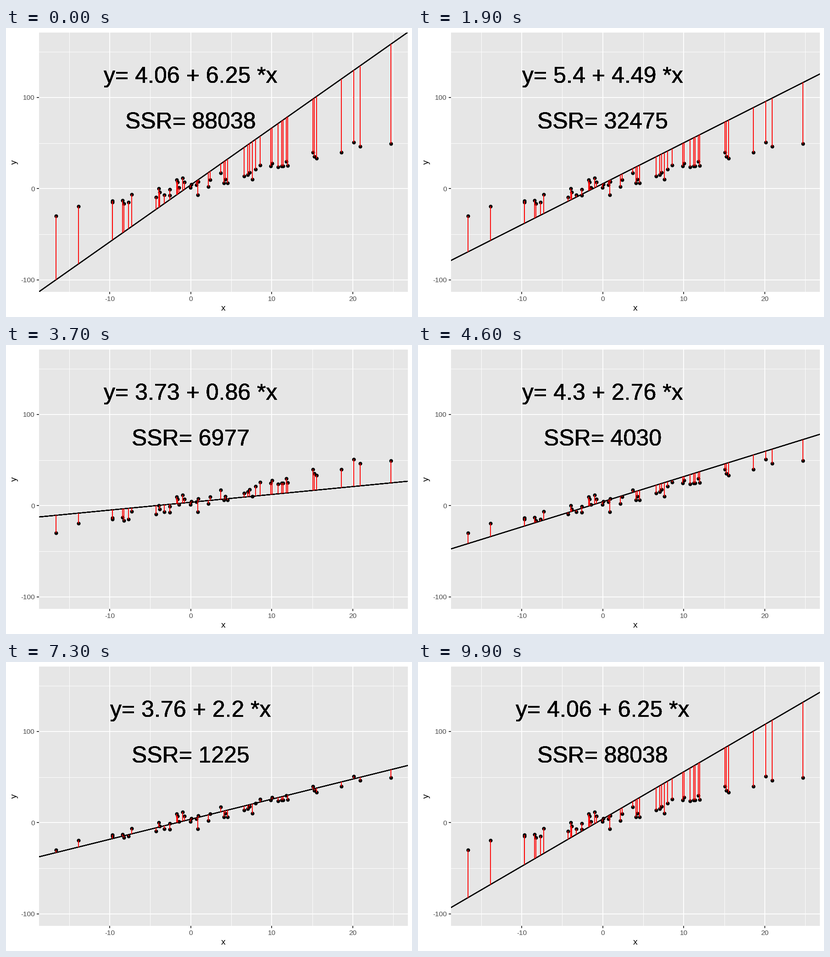
A matplotlib script for the animation above (10 s loop, 885 by 632 pixels).

```python
import matplotlib.pyplot as plt
import numpy as np
from matplotlib.animation import FuncAnimation
from matplotlib.collections import LineCollection

WIDTH, HEIGHT, DPI = 885, 632, 100
PX = 72 / DPI  # points per pixel
LEFT, RIGHT, TOP, BOTTOM = 72, 875.6, 10, 576.8
XLIM, YLIM = (-18.72, 26.77), (-113.0, 171.1)
FRAMES, INTERVAL = 100, 100
OVERDRAW = 12  # stacked copies harden the edges of text and line

plt.rcParams["font.family"] = "Liberation Sans"

x = np.array([
    -16.65, -13.85, -9.64, -9.64, -8.39, -8.22, -7.68, -7.26, -4.29, -3.95,
    -3.86, -3.24, -2.59, -2.56, -1.74, -1.65, -1.45, -1.03, -0.80, -0.04,
    0.05, 0.70, 0.84, 0.92, 2.17, 2.39, 3.71, 4.12, 4.29, 4.52,
    6.61, 7.04, 7.28, 7.60, 8.00, 8.54, 9.87, 10.01, 10.80, 11.23,
    11.40, 11.79, 11.96, 15.10, 15.25, 15.53, 18.58, 20.14, 20.88, 24.70])
y = np.array([
    -29.9, -19.6, -13.4, -14.9, -12.9, -16.4, -14.9, -6.4, -9.1, 0.15,
    -3.9, -6.9, -0.9, -7.4, 9.9, 7.2, 1.15, 11.9, 7.2, 1.4,
    4.9, 4.2, -6.9, 7.7, 2.2, 9.9, 17.2, 6.2, 10.4, 6.2,
    13.7, 15.4, 17.7, 10.4, 21.2, 25.7, 24.7, 27.7, 23.5, 24.5,
    24.5, 29.7, 25.2, 40.0, 35.5, 33.5, 40.0, 50.8, 46.3, 49.3])

# intercept, slope, sum of squared residuals
FITS = [
    (4.06, 6.25, 88038), (4.32, -1.89, 71704), (5.4, 4.49, 32475),
    (4.3, 3.18, 8053), (3.73, 0.86, 6977), (4.3, 2.76, 4030),
    (4.58, 1.53, 1881), (5.8, 2.06, 1277), (3.76, 2.2, 1225),
    (4.1, 2.12, 1117), (3.83, 1.98, 1001)]
MOVES = [5, 5] + [4] * 9  # frames per transition
HOLD = 5

# Piecewise-linear timeline: hold a fit, then move on to the next one
key_frames, key_states = [0, HOLD - 1], [0, 0]
for state, move in enumerate(MOVES, start=1):
    arrival = key_frames[-1] + move
    key_frames += [arrival, arrival + HOLD]
    key_states += [state, state]

fig = plt.figure(figsize=(WIDTH / DPI, HEIGHT / DPI), dpi=DPI, facecolor="white")
ax = fig.add_axes([LEFT / WIDTH, 1 - BOTTOM / HEIGHT,
                   (RIGHT - LEFT) / WIDTH, (BOTTOM - TOP) / HEIGHT],
                  facecolor="#e6e6e6")
ax.set(xlim=XLIM, ylim=YLIM, xticks=[-10, 0, 10, 20], yticks=[-100, 0, 100])
ax.set_xticks([-15, -5, 5, 15, 25], minor=True)
ax.set_yticks([-50, 50, 150], minor=True)
ax.set_axisbelow(True)
ax.spines[:].set_visible(False)
ax.tick_params(which="major", length=4.8 * PX, width=1.87 * PX, color="#333333",
               labelleft=False, labelbottom=False)
ax.tick_params(which="minor", length=0)
ax.grid(which="minor", color="white", lw=0.94 * PX)
ax.grid(which="major", color="white", lw=1.87 * PX)


def to_px(data_x, data_y):
    px = LEFT + (data_x - XLIM[0]) / (XLIM[1] - XLIM[0]) * (RIGHT - LEFT)
    py = BOTTOM - (data_y - YLIM[0]) / (YLIM[1] - YLIM[0]) * (BOTTOM - TOP)
    return px, py


def label(px, baseline, text, size, color="black", ha="center", rotation=0):
    return fig.text(px / WIDTH, 1 - baseline / HEIGHT, text, fontsize=size * PX,
                    color=color, ha=ha, va="baseline", rotation=rotation,
                    rotation_mode="anchor")


for tick in ax.get_xticks():
    label(to_px(tick, 0)[0], 596.6, f"{tick:g}", 15.4, "#4d4d4d")
for tick in ax.get_yticks():
    label(63, to_px(0, tick)[1] + 5.5, f"{tick:g}", 15.4, "#4d4d4d", ha="right")
label((LEFT + RIGHT) / 2, 618.5, "x", 19.3)
label(23, (TOP + BOTTOM) / 2, "y", 19.3, rotation=90)

ax.plot(x, y, "o", color="black", ms=8.1 * PX, mew=0, zorder=3)
fit_line = ax.add_collection(LineCollection(
    [], colors="black", linewidths=1.87 * PX, zorder=4), autolim=False)
residuals = ax.add_collection(LineCollection(
    [], colors="red", linewidths=1.87 * PX, capstyle="butt", zorder=5), autolim=False)

center = to_px(0, 0)[0]
equations = [label(center, 120, "", 50) for _ in range(OVERDRAW)]
scores = [label(center, 220, "", 50) for _ in range(OVERDRAW)]


def draw(frame):
    position = np.interp(frame, key_frames, key_states)
    looped = np.array(FITS + FITS[:1])
    a, b = (np.interp(position, range(len(looped)), looped[:, i]) for i in (0, 1))
    fit_line.set_segments([[(u, a + b * u) for u in (-20, 28)]] * OVERDRAW)
    residuals.set_segments(
        np.stack([np.column_stack([x, y]), np.column_stack([x, a + b * x])], axis=1))

    # Labels jump to the nearest fit halfway through a transition
    intercept, slope, ssr = FITS[int(position + 0.5 + 1e-9) % len(FITS)]
    for text in equations:
        text.set_text(f"y= {intercept:g} + {slope:g} *x")
    for text in scores:
        text.set_text(f"SSR= {ssr}")
    return [fit_line, residuals, *equations, *scores]


animation = FuncAnimation(fig, draw, frames=FRAMES, interval=INTERVAL, repeat=True)
plt.show()
```
